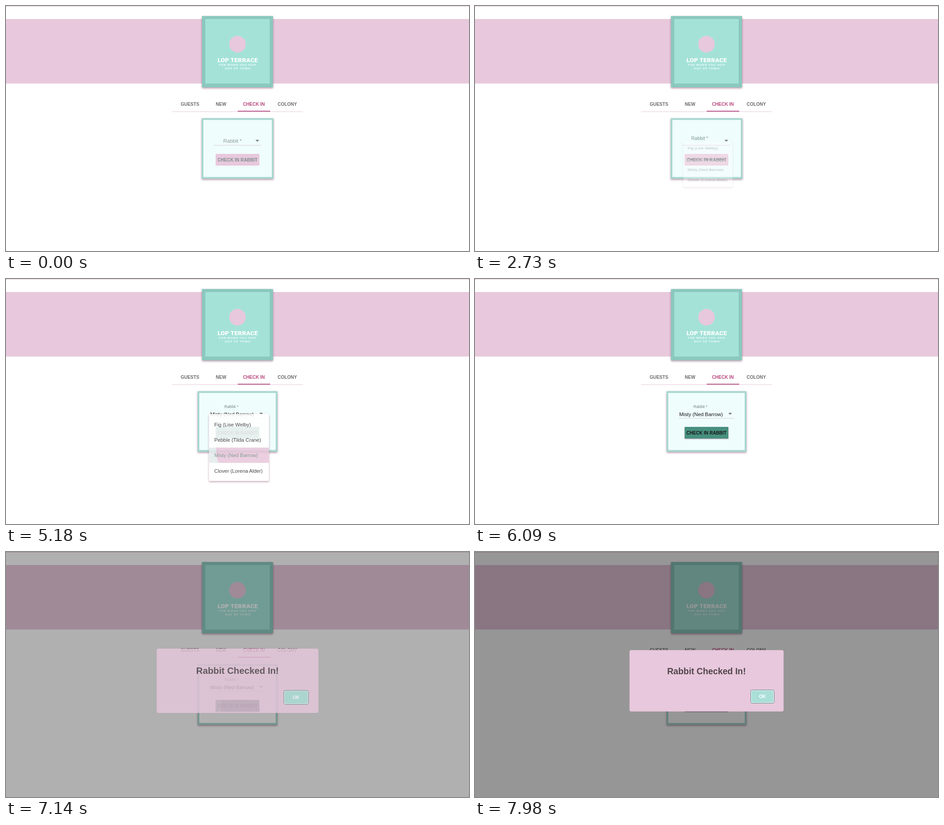
Animation, 1027 px wide and 545 px high, one loop 8000 ms. Source, as an HTML page:

```html
<!DOCTYPE html>
<html lang="en">
<head>
<meta charset="utf-8">
<title>Rabbit check-in</title>
<style>
  html, body { margin: 0; width: 100%; height: 100%; overflow: hidden; background: #555; }
  svg { display: block; width: 1027px; height: 545px; }
  text { font-family: "Liberation Sans", Arial, sans-serif; white-space: pre; }
  .mid { text-anchor: middle; }
  .caps { font-size: 10px; font-weight: 700; text-anchor: middle; }
  .tab { fill: #6c6c6c; }
  .item { font-size: 11.3px; fill: #2b2b2b; }
  .brand { font: 900 13.4px Roboto, sans-serif; letter-spacing: .3px; }
  .motto { font: 700 6.4px Lato, sans-serif; letter-spacing: 1.1px; }
  .raised { filter: drop-shadow(0 2.5px 2.2px rgba(125, 60, 98, .55)); }
  #menu { transform-origin: 516px 300px; }
  #modal { transform-origin: 513.5px 286.5px; }
</style>
</head>
<body>
<svg viewBox="0 0 1027 545">
  <defs>
    <clipPath id="rowClip"><rect x="450.5" y="375" width="132.5" height="34"/></clipPath>
    <clipPath id="buttonClip"><rect x="465" y="329" width="97" height="26" rx="1"/></clipPath>
  </defs>

  <rect width="1027" height="545" rx="1.5" fill="#fff"/>
  <rect x="1" width="1025" height="1" fill="#e3c3d7"/>
  <rect y="29" width="1027" height="143.5" fill="#e8c8dc"/>

  <g>
    <rect class="raised" x="434.7" y="22.3" width="157.6" height="158.7" rx="1" fill="#8bc8be"/>
    <rect x="442" y="29" width="143" height="143.5" fill="#a4e2d8"/>
    <circle cx="513.5" cy="85" r="18.5" fill="#e8c8dc"/>
    <g class="mid" fill="#fff">
      <text class="brand" x="514" y="125">LOP TERRACE</text>
      <text class="motto" x="513.5" y="133.4">FOR WHEN YOU HOP</text>
      <text class="motto" x="514.5" y="141.4">OUT OF TOWN</text>
    </g>
  </g>

  <g>
    <rect x="368" y="234.5" width="291" height="1" fill="#e8c8dc"/>
    <rect id="tabHover" x="514" y="201" width="72" height="33" fill="#e8c8dc"/>
    <rect x="514" y="233" width="72" height="1.8" fill="#b34a80"/>
    <text class="caps tab" x="408" y="221.7">GUESTS</text>
    <text class="caps tab" x="477" y="221.7">NEW</text>
    <text class="caps" x="549.8" y="221.7" fill="#b8457c">CHECK IN</text>
    <text class="caps tab" x="624" y="221.7">COLONY</text>
  </g>

  <g>
    <g class="raised"><rect id="edge" y="249.6" height="134.8" rx="1" fill="#a6d7cf"/></g>
    <rect id="card" y="253.4" height="127" fill="#f0fdfd"/>
    <rect id="line" y="309.4" height="1" fill="#dccbd5"/>
    <path id="arrow" d="M-4 -1.8H4L0 2.2Z" fill="#6a6a6a"/>
    <text id="label" font-size="11.5">Rabbit *</text>
    <text id="value" class="item" x="453" y="304.6" style="fill:#161616">Misty (Ned Barrow)</text>
    <g id="buttonLift">
      <rect id="button" x="465" y="329" width="97" height="26" rx="1"/>
    </g>
    <circle id="press" cx="545" cy="342" fill="#000" opacity=".22" clip-path="url(#buttonClip)"/>
    <text id="caption" class="caps" x="513.5" y="345.6">CHECK IN RABBIT</text>
  </g>

  <g id="menu">
    <rect class="raised" x="450.2" y="300.3" width="133" height="149" rx="1.5" fill="#fff"/>
    <g id="rows"></g>
  </g>

  <rect id="shade" width="1027" height="545"/>

  <g id="modal">
    <rect x="342.7" y="218.3" width="341.8" height="136.4" rx="3.6" fill="#e8c8dc"/>
    <text class="mid" x="513.5" y="271.8" font-size="19.3" font-weight="700" fill="#51464d">Rabbit Checked In!</text>
    <rect x="611.6" y="306.8" width="52" height="29.6" rx="4" fill="#fff" stroke="#6f8a90" stroke-width="1.2"/>
    <rect x="613.2" y="308.4" width="48.8" height="26.4" rx="3" fill="#aadfd7"/>
    <text class="caps" x="637.5" y="325.4" fill="#fff">OK</text>
  </g>
</svg>

<script>
const LOOP = 8000;
const PICK = 5110;   // the choice is taken over into the field
const PINK = '#e8c8dc';
const $ = id => document.getElementById(id);

// Steps are [time, value]; the first and last values hold to the ends of the loop.
function play(id, prop, ...steps) {
  const all = [[0, steps[0][1]], ...steps, [LOOP, steps[steps.length - 1][1]]];
  $(id).animate(
    all.map(([t, v]) => ({ offset: t / LOOP, [prop]: v })),
    { duration: LOOP, iterations: Infinity }
  );
}
const cut = (id, prop, time, before, after) => play(id, prop, [time, before], [time, after]);

// Menu rows: text, hover start, hover end
const rows = [
  ['Fig (Lise Welby)', 3785, 4130],
  ['Pebble (Tilda Crane)', 4130, 4550],
  ['Misty (Ned Barrow)', 4550, LOOP],
  ['Clover (Lorena Alder)']
];
$('rows').innerHTML = rows.map(([name], i) => {
  const y = 306.3 + i * 34.3;
  const ripple = i === 2
    ? '<circle id="ripple" cx="540" cy="381" fill="' + PINK + '" clip-path="url(#rowClip)"/>' : '';
  return `<rect id="row${i}" x="450.5" y="${y}" width="132.5" height="34.3" opacity="0" fill="${PINK}"/>
    ${ripple}<text id="name${i}" class="item" x="462" y="${y + 21.4}">${name}</text>`;
}).join('');

rows.forEach(([, from, to], i) => {
  if (!from) return;
  const tail = (on, off) => to < LOOP ? [[to, on], [to + 150, off]] : [];
  play('row' + i, 'opacity', [from, 0], [from + 150, 1], ...tail(1, 0));
  play('name' + i, 'fill', [from, '#2b2b2b'], [from + 150, '#6f8a86'], ...tail('#6f8a86', '#2b2b2b'));
});
cut('row2', 'fill', PICK, PINK, '#e4ebea');
play('ripple', 'r', [4970, '0px'], [PICK, '58px'], [5180, '74px'], [5300, '102px']);

play('tabHover', 'opacity', [1400, 0], [1650, 1], [2230, 1], [2380, 0]);

// Card and field widen to fit the chosen text
cut('edge', 'x', PICK, '434px', '425px');
cut('edge', 'width', PICK, '159.4px', '177px');
cut('card', 'x', PICK, '437.8px', '428.8px');
cut('card', 'width', PICK, '151.8px', '169.4px');
cut('card', 'fill', 7060, '#f0fdfd', '#fff');
cut('line', 'x', PICK, '460.5px', '452px');
cut('line', 'width', PICK, '105.5px', '123px');
cut('arrow', 'transform', PICK, 'translate(557.5px,299.6px)', 'translate(566px,299.6px)');
cut('value', 'opacity', PICK, 0, 1);

const small = 'translate(475.8px,285.7px) scale(.75)';
play('label', 'transform',
  [2660, 'translate(482px,304.2px) scale(1)'], [2860, small],
  [PICK, small], [PICK, 'translate(484.6px,287.4px) scale(.75)']);
play('label', 'fill', [2660, '#8f9797'], [2860, '#4f978a'], [PICK, '#4f978a'], [5180, '#71817e']);

play('menu', 'opacity', [2660, 0], [2900, 1], [5145, 1], [5180, .87], [5390, 0]);
play('menu', 'transform', [2660, 'scale(.75,.56)'], [2900, 'scale(1,1)']);

play('button', 'fill', [PICK, PINK], [5180, '#4a9a8a'], [5950, '#4a9a8a'], [6200, '#458877']);
play('caption', 'fill', [PICK, '#7b8f8f'], [5180, '#151515']);
play('buttonLift', 'filter',
  [PICK, 'drop-shadow(0 0 0 rgba(125,60,98,0))'],
  [5360, 'drop-shadow(0 1px 1px rgba(125,60,98,.5))']);
play('press', 'r', [6800, '0px'], [7070, '54px'], [7250, '90px']);

play('shade', 'opacity', [7060, 0], [7070, .03], [7140, .31], [7210, .385], [7300, .41]);
play('modal', 'opacity', [7075, 0], [7140, .8], [7210, 1]);
play('modal', 'transform',
  [7075, 'scale(.7)'], [7140, 'scale(1.05)'], [7250, 'scale(.95)'], [7350, 'scale(1)']);
</script>
</body>
</html>
```
